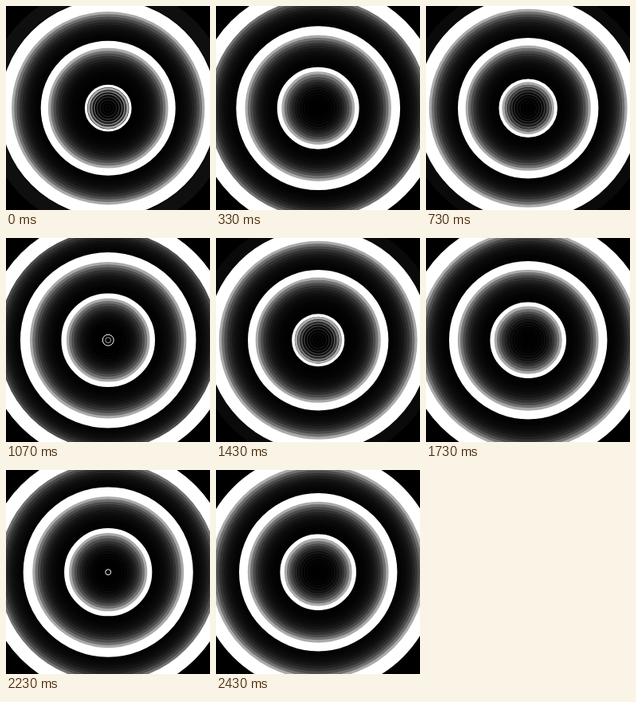
Animation, 256 px wide and 256 px high, one loop 2.46 s. Source, as an HTML page with a canvas:

```html
<!DOCTYPE html>
<html lang="en">
<head>
<meta charset="utf-8">
<title>Expanding rings</title>
<style>
  html, body { margin: 0; height: 100%; overflow: hidden; background: #000; }
  canvas { display: block; }
</style>
</head>
<body>
<canvas id="stage" width="256" height="256"></canvas>
<script>
const ctx = document.getElementById('stage').getContext('2d');
const LOOP = 2460;       // ms
const STEP = 100 / 3;    // ms per picture, two simulation ticks each
const CENTER = 128.2;
const GROWTH = 42;       // ticks a ring expands
const LIFE = 44;         // ticks a ring is drawn
const TRAIL = 22;        // ticks of fading afterglow
const KEEP = 2 / 3;      // brightness left after each tick

const birth = ring => Math.floor(ring * 85 / 6) - 8;

function drawRings(tick, brightness) {
  const level = Math.round(255 * brightness);
  ctx.strokeStyle = `rgb(${level},${level},${level})`;
  for (let ring = -6; birth(ring) < tick; ring++) {
    const age = tick - birth(ring);
    if (age > LIFE) continue;
    const size = Math.min(age, GROWTH);
    ctx.lineWidth = Math.max(1, 0.4 * size);
    ctx.beginPath();
    ctx.arc(CENTER, CENTER, 3.475 * size, 0, 2 * Math.PI);
    ctx.stroke();
  }
}

function render(ms) {
  const time = Math.floor(ms % LOOP / 10) * 10;
  const tick = 2 * Math.floor((time + 4) / STEP);
  ctx.fillStyle = '#000';
  ctx.fillRect(0, 0, 256, 256);
  for (let back = TRAIL; back >= 0; back--) drawRings(tick - back, KEEP ** back);
}

const start = performance.now();
function loop() {
  render(performance.now() - start);
  requestAnimationFrame(loop);
}
loop();
</script>
</body>
</html>
```
